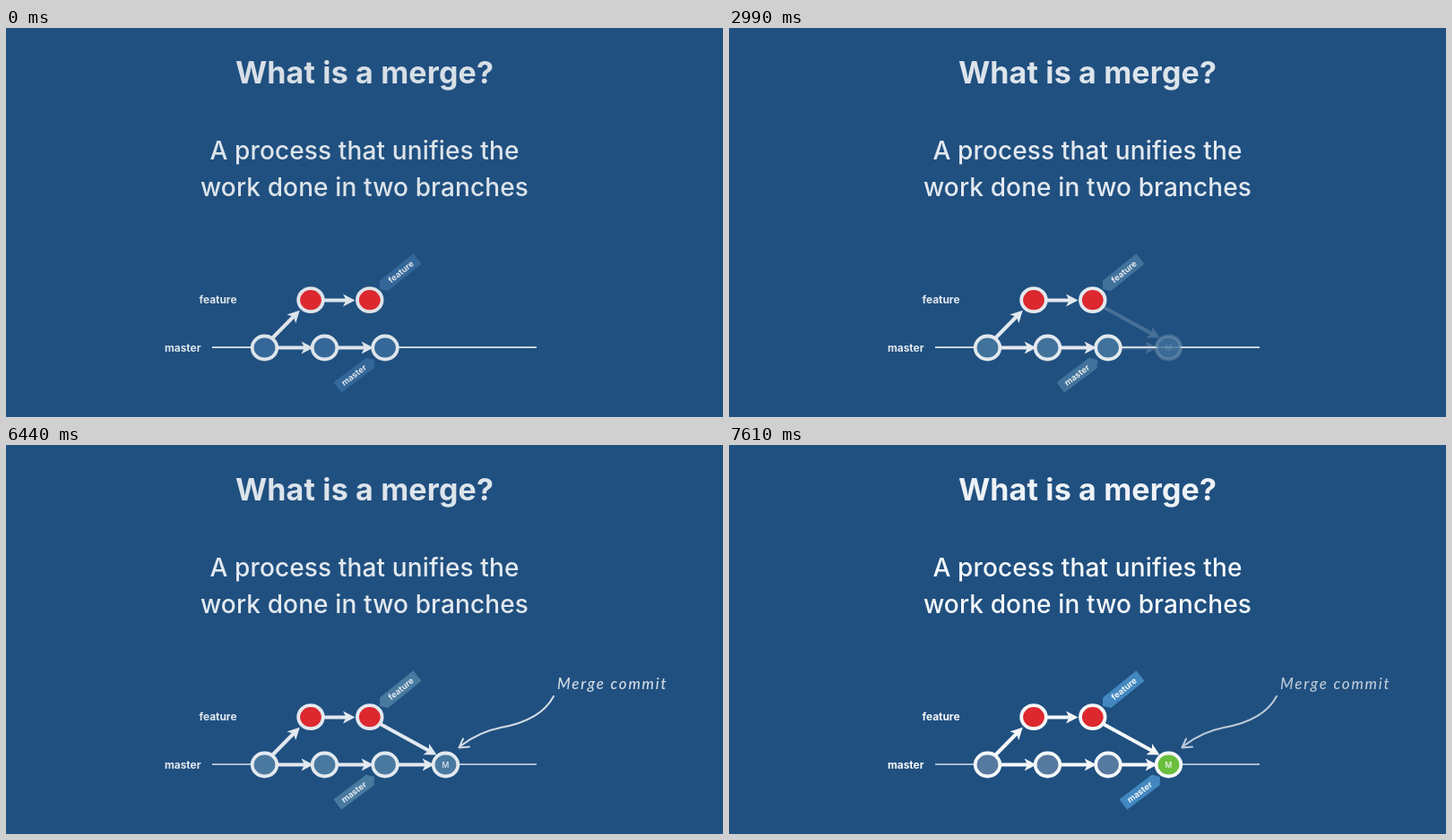
These frames come from a looping animation (800x435 px, 7740 ms). An HTML page:

```html
<!DOCTYPE html>
<html lang="en">
<head>
<meta charset="utf-8">
<title>What is a merge?</title>
<style>
  html, body { margin: 0; width: 100%; height: 100%; overflow: hidden; background: #205080; }
  svg { display: block; width: 100%; height: 100%; font-family: Inter, Roboto, sans-serif; }
  text { fill: var(--ink); }
  .mid { text-anchor: middle; }
  .title { font-size: 34px; font-weight: 700; letter-spacing: .15px; opacity: .97; }
  .sub { font-size: 28px; font-weight: 500; letter-spacing: .13px; }
  .label { font-size: 11.9px; font-weight: 700; text-anchor: end; }
  .tag path { fill: var(--tag); }
  .tag text { font-size: 9.5px; font-weight: 700; }
  .arrow { stroke: var(--ink); stroke-width: 4; marker-end: url(#head); }
  .head { fill: var(--ink); }
  .disc { fill: var(--disc); stroke: var(--ink); stroke-width: 3.8; }
  .red { fill: #dc282e; }
  .plate { fill: var(--disc); }
  .base { stroke: var(--base); stroke-width: 1.8; }
  .note { fill: none; stroke: var(--note); stroke-width: 2; stroke-linecap: round; stroke-linejoin: round; }
  .note text { fill: var(--note); stroke: none; font: italic 500 17px Lato, cursive; letter-spacing: 1.8px; }
</style>
</head>
<body>
<svg id="stage" viewBox="0 0 800 435">
  <defs>
    <marker id="head" markerUnits="userSpaceOnUse" markerWidth="14" markerHeight="15" refX="6" refY="7.5" orient="auto">
      <path class="head" d="M0 0.5L13.5 7.5L0 14.5L3.5 7.5Z"/>
    </marker>
  </defs>

  <text class="title mid" x="400" y="62">What is a merge?</text>
  <text class="sub mid" x="400" y="146.5">A process that unifies the</text>
  <text class="sub mid" x="400" y="188">work done in two branches</text>

  <text class="label" x="257.5" y="308.3">feature</text>
  <text class="label" x="217.5" y="361.7">master</text>
  <path class="base" d="M230 357.2H592"/>

  <g class="tag" transform="translate(417 292) rotate(-39)">
    <path d="M0 0L6-7.3H54V7.3H6Z"/>
    <text class="mid" x="30.5" y="3.2">feature</text>
  </g>
  <g class="tag" id="master">
    <g transform="rotate(-37)">
      <path d="M0 0L-6-7.3H-51.5V7.3H-6Z"/>
      <text class="mid" x="-28.5" y="3.2">master</text>
    </g>
  </g>

  <path class="arrow" d="M296.5 347.5L322.5 321"/>
  <path class="arrow" d="M355 304.5H382"/>
  <path class="arrow" d="M303 357.5H335.5"/>
  <path class="arrow" d="M370 357.5H402.5"/>
  <ellipse class="disc red" cx="340" cy="304.2" rx="13.8" ry="13"/>
  <ellipse class="disc red" cx="405.8" cy="304.2" rx="13.8" ry="13"/>
  <ellipse class="disc" cx="288.5" cy="357.5" rx="13.8" ry="13"/>
  <ellipse class="disc" cx="355.5" cy="357.5" rx="13.8" ry="13"/>
  <ellipse class="disc" cx="423" cy="357.5" rx="13.8" ry="13"/>

  <ellipse class="plate" id="plate" cx="490.5" cy="357.5" rx="13.8" ry="13"/>
  <g id="merge">
    <path class="arrow" d="M418.5 312.5L474 343"/>
    <path class="arrow" d="M438 357.5H470.5"/>
    <ellipse class="disc" id="commit" cx="490.5" cy="357.5" rx="13.8" ry="13"/>
    <text class="mid" x="490.5" y="360.6" font-size="8.5" font-weight="500">M</text>
  </g>

  <g class="note" id="note">
    <text x="615" y="272.8">Merge commit</text>
    <path d="M611 281C601 300 580 311 552 316C532 320 518 328 506 337.5"/>
    <path d="M510 328.5L505.5 338.5L517 337.5"/>
  </g>
</svg>
<script>
  const LOOP = 7740, FIRST = 1790, STEP = 150, FADE = 7 * STEP;
  const get = id => document.getElementById(id);
  const stage = get('stage'), merge = get('merge'), note = get('note');
  const plate = get('plate'), commit = get('commit'), master = get('master');

  const clamp = x => Math.min(1, Math.max(0, x));
  const ease = x => x * x * (3 - 2 * x);
  const progress = (t, start) => clamp((t - start + STEP) / FADE);
  const mix = (a, b, p) => `rgb(${a.map((v, i) => Math.round(v + (b[i] - v) * p))})`;
  const set = (name, color) => stage.style.setProperty('--' + name, color);

  // The picture holds between steps; the last step comes slightly early.
  function snap(t) {
    if (t < FIRST) return 0;
    if (t >= 7610) return 7640;
    return FIRST + Math.floor((t - FIRST) / STEP) * STEP;
  }

  function draw(time) {
    const t = snap(time % LOOP);
    const warm = ease(progress(t, 1790));
    const late = ease(progress(t, 5690));
    const done = t >= 6740;

    set('ink', done ? '#f5f8fa' : mix([221, 228, 234], [227, 233, 239], warm));
    set('base', mix([224, 230, 236], [184, 204, 222], late));
    set('disc', done ? '#56799f' : late > .1
      ? mix([65, 114, 155], [74, 121, 160], late)
      : mix([53, 104, 153], [65, 114, 155], warm));
    set('tag', done ? '#4287c0' : late > .1
      ? mix([65, 114, 155], [72, 122, 160], late)
      : mix([51, 102, 153], [65, 114, 155], warm));
    set('note', done ? '#bdcad8' : '#dfe5eb');

    const joined = ease(progress(t, 2840));
    merge.style.opacity = joined;
    plate.style.opacity = clamp(4 * joined);
    note.style.opacity = late > .1 ? late : 0;
    commit.style.fill = done ? '#6abf3d' : '';
    master.setAttribute('transform', `translate(${411 + 70 * progress(t, 6740)} 371)`);
  }

  const begin = performance.now();
  function tick() {
    draw(performance.now() - begin);
    requestAnimationFrame(tick);
  }
  tick();
</script>
</body>
</html>
```
